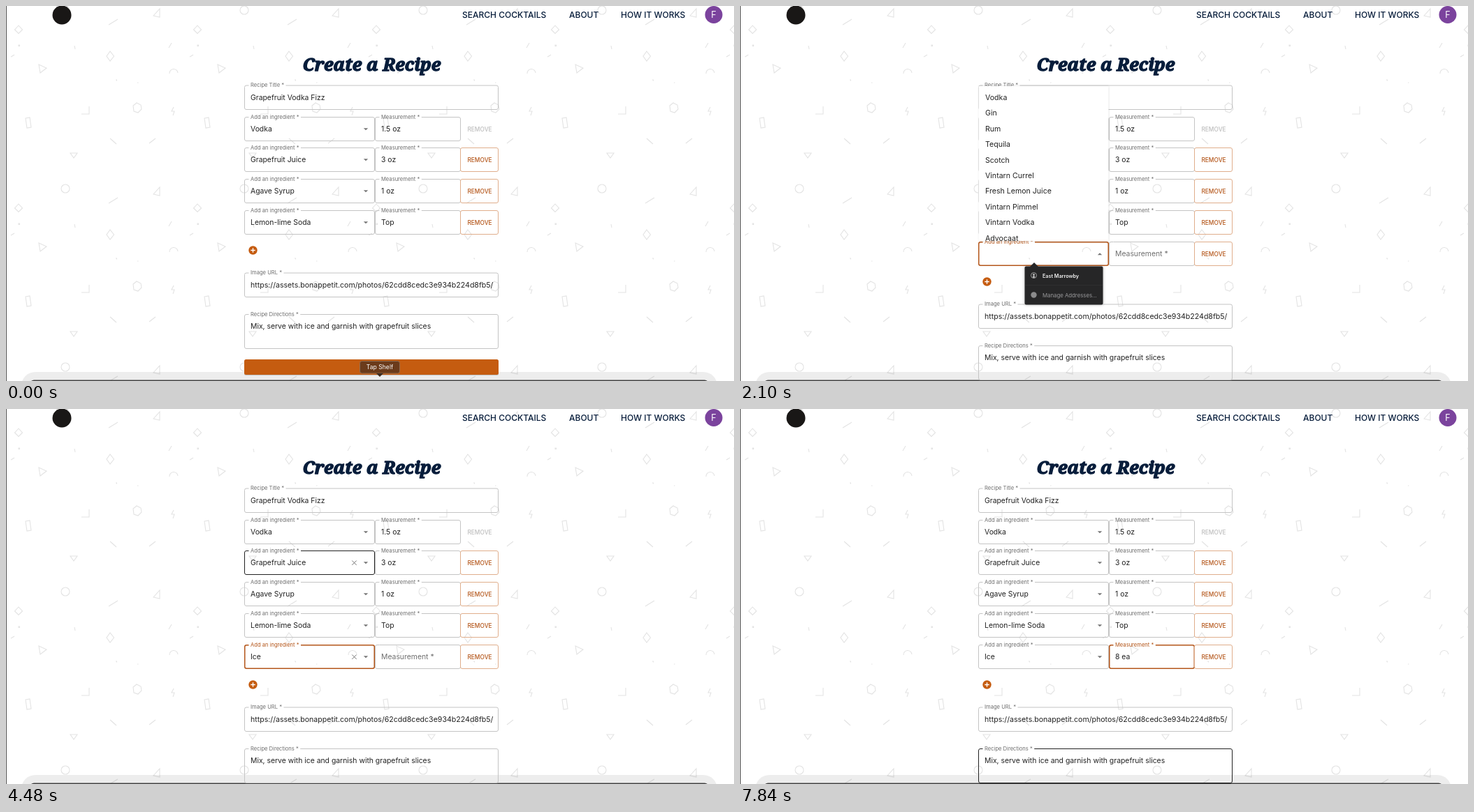
Recreate the animation shown at these times as an HTML page with a canvas. Size 1042x538 px, loop 8000 ms.

```html
<!DOCTYPE html>
<html lang="en">
<head>
<meta charset="utf-8">
<title>Create a Recipe</title>
<style>
  html, body { margin: 0; width: 100%; height: 100%; overflow: hidden; background: #fff; }
  canvas { display: block; width: 100vw; height: 100vh; }
</style>
</head>
<body>
<canvas id="stage" width="1042" height="538"></canvas>
<script>
const c = document.getElementById('stage').getContext('2d');
const LOOP = 8000, SANS = 'Inter, "Open Sans", sans-serif', SIZE = 10.4, WIDE = 10.6, SMALL = 7.6;
const ORANGE = '#c55c10', RUST = '#b4561a', INK = '#222', NAVY = '#071d3b';
const ROW = 44.8, PITCH = 22.45, LIST_TOP = 115, LIST_END = 337;

// Moments of the story, in ms
const ADD = 1190, FOCUS = 1540, OPEN = 1610, POPUP = 1750, CLOSE = 4340, MEASURE = 5040;
const typedName = [[2380, 'I'], [2520, 'Ic'], [2590, 'Ice']];
const typedAmount = [[5880, '*'], [6580, ''], [6720, '8'], [7000, '8 '], [7140, '8 e'], [7210, '8 ea']];
const caretResets = [1610, 2380, 2660, MEASURE, 5880, 6580, 7210];

const rows = [['Vodka', '1.5 oz'], ['Grapefruit Juice', '3 oz'], ['Agave Syrup', '1 oz'], ['Lemon-lime Soda', 'Top']];
const options = {
  '': ['Vodka', 'Gin', 'Rum', 'Tequila', 'Scotch', 'Vintarn Currel', 'Fresh Lemon Juice', 'Vintarn Pimmel',
    'Vintarn Vodka', 'Advocaat'],
  I: ['Gin', 'Tequila', 'Fresh Lemon Juice', 'Allspice', 'Anis', 'Apple Cider', 'Apricot Brandy', 'Aquavit',
    'Bitters', 'Cider'],
  Ic: ['Allspice', 'Apricot Brandy', 'Apricot Nectar', 'Fruit Juice', 'Licorice Root', 'Pomegranate Juice',
    'Apple Juice', 'Cherry Juice', 'Chocolate Ice-cream', 'Cranberry Juice'],
  Ice: ['Allspice', 'Fruit Juice', 'Pomegranate Juice', 'Apple Juice', 'Cherry Juice', 'Chocolate Ice-cream',
    'Brinavo Juice', 'Cranberry Juice', 'Grape Juice', 'Grapefruit Juice', 'Guava Juice', 'Ice', 'Lemon Juice',
    'Licorice Root', 'Lime Juice', 'Orange Juice', 'Pineapple Juice', 'Tomato Juice']
};

const clamp = v => Math.max(0, Math.min(1, v));
const ramp = (t, a, b) => clamp((t - a) / (b - a));
const ease = p => p * p * (3 - 2 * p);
const within = (t, a, b) => t >= a && t < b;
const latest = (list, t) => list.reduce((v, [at, s]) => t >= at ? s : v, '');
const rowY = k => Math.floor(114.3 + ROW * k) + 0.5;

function text(s, x, y, size = SIZE, color = INK, weight = 400, align = 'left') {
  c.font = `${weight} ${size}px ${SANS}`;
  c.fillStyle = color;
  c.textAlign = align;
  c.fillText(s, x, y);
}
function box(x, y, w, h, r, fill, stroke, lw = 1) {
  c.beginPath();
  c.roundRect(x, y, w, h, r);
  if (fill) { c.fillStyle = fill; c.fill(); }
  if (stroke) { c.strokeStyle = stroke; c.lineWidth = lw; c.stroke(); }
}
function poly(points, fill) {
  c.beginPath();
  points.forEach(p => c.lineTo(...p));
  c.fillStyle = fill;
  c.fill();
}
function disc(x, y, r, fill) {
  c.beginPath();
  c.arc(x, y, r, 0, 7);
  c.fillStyle = fill;
  c.fill();
}
function strokes(lines, color, lw) {
  c.beginPath();
  for (const [x1, y1, x2, y2] of lines) { c.moveTo(x1, y1); c.lineTo(x2, y2); }
  c.strokeStyle = color;
  c.lineWidth = lw;
  c.stroke();
}

// Confetti tile, repeated every 256 px
const confetti = new Path2D([
  'M18 28l5.5 6-5.5 5.5-5.5-5.5z', 'M149 65l5.5 7-5.5 7-5-7z', 'M47 84l11 5-9 7z',
  'M234 97a6 6 0 0 1 12-1', 'M182 143l5-4 6 3 1 6-5 5-6-2z', 'M119 144v11h-11', 'M240 145l-3 6h4l-2 6',
  'M28 161l6-1 2 14-6 1z', 'M205 197l9-7', 'M149 190l9 8', 'M92 211h10l-5 7z',
  'M79 6a6 6 0 1 1 12 0a6 6 0 1 1-12 0z', 'M211 14l9-10v12z', 'M147 27l13-8', 'M7 73l5-3',
  'M98 57l1 5', 'M233 60l4-7', 'M18 56h1.5v1.5h-1.5z', 'M188 110h1.5', 'M157 106h1.5v1.5'
].join(''));

function backdrop() {
  c.fillStyle = '#fff';
  c.fillRect(0, 0, 1042, 538);
  c.strokeStyle = '#e3e3e3';
  c.lineWidth = 1.1;
  for (let x = 0; x < 1042; x += 256)
    for (let y = 0; y < 538; y += 256) {
      c.save();
      c.translate(x, y);
      c.stroke(confetti);
      c.restore();
    }
  box(22, 525, 996, 40, 30, 'rgba(0,0,0,.07)');
  box(34, 536.5, 972, 20, 6, '#444');
  c.fillStyle = '#555';
  c.fillRect(0, 0, 1, 538);
}

function header() {
  disc(80, 13, 13.5, '#191716');
  text('SEARCH COCKTAILS', 653, 17, 12, NAVY, 500);
  text('ABOUT', 806, 17, 12, NAVY, 500);
  text('HOW IT WORKS', 880, 17, 12, NAVY, 500);
  disc(1013, 12.5, 12.5, '#7b439d');
  text('F', 1013, 17, 12.5, '#fff', 400, 'center');
  c.font = 'italic 900 25.3px "Noto Serif", serif';
  c.fillStyle = c.strokeStyle = NAVY;
  c.lineWidth = 1.4;
  c.lineJoin = 'round';
  c.fillText('Create a Recipe', 523.5, 93);
  c.strokeText('Create a Recipe', 523.5, 93);
  c.lineJoin = 'miter';
}

// Outlined input whose label rises into a gap in the border; a focused border grows inwards
function field(x, y, w, h, label, value, { focus, hover, lift = 1, size = SIZE } = {}) {
  c.font = `400 ${SMALL}px ${SANS}`;
  const gap = (c.measureText(label).width + 5) * lift, r = 2.5, inset = focus ? 0.25 : 0;
  const left = x + inset, top = y + inset, right = x + w - inset, bottom = y + h - inset;
  c.beginPath();
  c.moveTo(x + 6 + gap, top);
  c.arcTo(right, top, right, bottom, r);
  c.arcTo(right, bottom, left, bottom, r);
  c.arcTo(left, bottom, left, top, r);
  c.arcTo(left, top, right, top, r);
  c.lineTo(x + 6, top);
  c.strokeStyle = focus ? RUST : hover ? INK : '#c4c4c4';
  c.lineWidth = 1 + 2 * inset;
  c.stroke();
  text(label, x + 8.5, y + 20.7 - 18.3 * lift, SIZE + (SMALL - SIZE) * lift, focus ? RUST : '#6f6f6f');
  text(value, x + 8.5, y + 20.5, size);
}

function removeButton(y, disabled) {
  if (!disabled) box(650.5, y, 54, 34, 2.5, null, '#e0ae8c');
  text('REMOVE', 678, y + 20.2, 8.4, disabled ? '#bdbdbd' : RUST, 500, 'center');
}
function arrow(y, up) {
  const d = up ? -1.5 : 1.5;
  poly([[511.8, y - d], [518.2, y - d], [515, y + d]], '#757575');
}
function clearMark(y) {
  strokes([[495.3, y - 3.2, 501.7, y + 3.2], [495.3, y + 3.2, 501.7, y - 3.2]], '#757575', 1);
}
function ingredient(k, name, amount, nameState, amountState, open) {
  const y = rowY(k);
  field(341.5, y, 186, 34, 'Add an ingredient *', name, nameState);
  field(528.5, y, 122, 34, 'Measurement *', amount, amountState);
  arrow(y + 17.2, open);
  if (nameState.clear) clearMark(y + 17.2);
  removeButton(y, k === 1);
}

function caret(t, x) {
  const last = caretResets.filter(a => a <= t).pop();
  if (last && Math.floor((t - last) / 490) % 2 === 0) {
    c.fillStyle = INK;
    c.fillRect(x, 348, 1, 15);
  }
}

function list(t, query) {
  const move = ease(ramp(t, 3200, 3750)), scroll = 7 * PITCH * move, mouse = 266 - 45 * move;
  const first = 131 - PITCH / 2;
  c.save();
  c.shadowColor = 'rgba(0,0,0,.16)';
  c.shadowBlur = 3;
  c.fillStyle = '#fff';
  c.fillRect(341.5, LIST_TOP, 186, LIST_END - LIST_TOP);
  c.restore();
  c.save();
  c.beginPath();
  c.rect(341, LIST_TOP, 187, LIST_END - LIST_TOP);
  c.clip();
  if (t > 3010) {
    const over = Math.floor((mouse + scroll - first) / PITCH);
    c.fillStyle = '#f4f4f4';
    c.fillRect(341, first + over * PITCH - scroll, 187, PITCH);
  }
  options[query].forEach((s, i) => text(s, 351, 134.7 + PITCH * i - scroll, WIDE));
  if (within(t, 3010, 3780)) box(522.3, 122 + scroll * 0.26, 4.4, 59, 2.2, '#858585');
  c.restore();
}

function addressPopup() {
  c.save();
  c.shadowColor = 'rgba(0,0,0,.3)';
  c.shadowBlur = 4;
  box(407.5, 373.5, 112, 55, 2, '#262627');
  c.restore();
  poly([[415, 374], [421, 368], [427, 374]], '#262627');
  strokes([[408, 400.5, 519, 400.5]], '#2f2f30', 1);
  box(416.5, 382.5, 8, 8, 4, null, '#bbb', 0.8);
  disc(420.5, 385.5, 1.4, '#bbb');
  disc(420.5, 388.6, 1.6, '#bbb');
  disc(420.5, 414.5, 4.2, '#8b8b8c');
  text('East Marrowby', 433, 389.5, 7.2, '#f2f2f2', 600);
  text('Manage Addresses...', 433, 417.5, 7.8, '#98989a');
}

function plusButton(y) {
  disc(353.5, y, 6.2, ORANGE);
  strokes([[350.3, y, 356.7, y], [353.5, y - 3.2, 353.5, y + 3.2]], '#fff', 1.3);
}
function hints(t, shift) {
  c.globalAlpha = ramp(t, 700, 880) * (1 - ramp(t, ADD + 70, 1400));
  box(317.5, 372 + shift, 72, 15, 2.5, '#6b6b6b');
  text('Add an ingredient', 353.5, 382.2 + shift, 7.2, '#fff', 500, 'center');
  c.globalAlpha = 1 - ramp(t, 40, 350);
  box(506.5, 509.5, 57, 17.5, 3, '#6b3b1b', '#8f6c52');
  poly([[530, 527], [540, 527], [535, 532]], '#3d2a1e');
  text('Tap Shelf', 535, 521.4, 8.6, '#fff', 400, 'center');
  c.globalAlpha = 1;
}

function draw(t) {
  const added = t >= ADD, shift = added ? 45 : 0;
  const open = within(t, OPEN, CLOSE), query = latest(typedName, t), amount = latest(typedAmount, t);
  const onName = within(t, FOCUS, MEASURE), onAmount = t >= MEASURE;
  const hoverRow = within(t, CLOSE, 4550) ? 1 : within(t, 4550, 4620) ? 2 : within(t, 4620, 4690) ? 3 : -1;

  backdrop();
  header();
  field(341.5, 114, 363, 34.5, 'Recipe Title *', 'Grapefruit Vodka Fizz');
  rows.forEach(([name, qty], i) =>
    ingredient(i + 1, name, qty, { hover: i === hoverRow, clear: i === hoverRow }));
  if (added) {
    ingredient(5, query, amount,
      { focus: onName, hover: within(t, 1400, FOCUS), lift: ease(ramp(t, FOCUS, 1740)), clear: within(t, CLOSE, MEASURE) },
      { focus: onAmount, hover: within(t, 4690, MEASURE), lift: ease(ramp(t, MEASURE - 30, 5180)) }, open);
  }
  c.font = `400 ${SIZE}px ${SANS}`;
  const typedWidth = c.measureText(onAmount ? amount : query).width;
  if (onName || onAmount) caret(t, (onAmount ? 536.5 : 350) + typedWidth);

  plusButton(350.5 + shift);
  field(341.5, 383 + shift, 363, 34.5, 'Image URL *',
    'https://assets.bonappetit.com/photos/62cdd8cedc3e934b224d8fb5/', { size: WIDE });
  field(341.5, 442.5 + shift, 363, 49, 'Recipe Directions *', 'Mix, serve with ice and garnish with grapefruit slices',
    { hover: within(t, 6790, 7210) || t >= 7700 });
  if (!added) {
    box(341, 508, 364, 22, 2.5, 'rgba(0,0,0,.18)');
    box(341, 507, 364, 22, 2.5, ORANGE);
    text('SUBMIT', 523, 521.2, 8.4, '#fff', 500, 'center');
  }
  if (open) list(t, query);
  if (within(t, POPUP, 2380)) addressPopup();
  hints(t, shift);
}

const start = performance.now();
function tick() {
  draw((performance.now() - start) % LOOP);
  requestAnimationFrame(tick);
}
tick();
</script>
</body>
</html>
```
